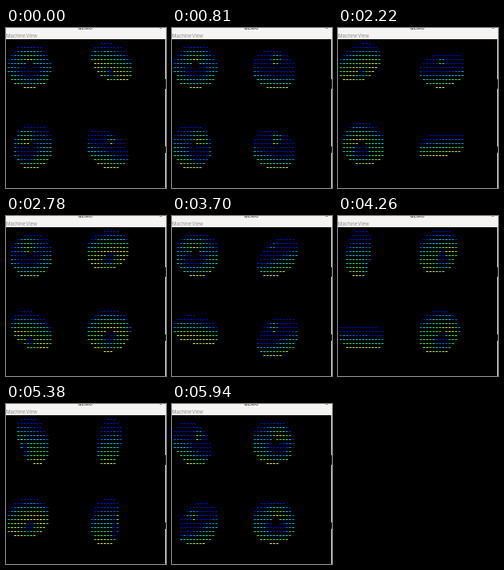
An HTML page with a canvas for the animation above (6.01 s loop, 200 by 200 pixels).

```html
<!DOCTYPE html>
<html lang="en">
<head>
<meta charset="utf-8">
<title>Four spinning donuts</title>
<style>
  html, body { margin: 0; width: 100%; height: 100%; overflow: hidden; background: #000; }
  #stage { position: relative; width: 200px; height: 200px; overflow: hidden; background: #000; }
  canvas { position: absolute; left: 0; top: 0; }
  #bar {
    position: absolute; left: 0; top: 0; width: 200px; height: 14px;
    background: #f5f4f2; color: #8c8c8c;
    font: 6px/8px Inter, "Open Sans", sans-serif;
  }
  #bar span { position: absolute; white-space: pre; }
  #title { left: 90px; top: -4px; color: #555; font-weight: 600; }
  #machine { left: 0; top: 6px; }
  #view { left: 25px; top: 6px; }
  #close { position: absolute; left: 192px; top: 0; width: 3px; height: 1px; background: #999; }
  #edge {
    position: absolute; left: 199px; top: 14px; width: 1px; height: 186px;
    background: linear-gradient(#e4e4e4 50px, #222 50px 62px, #e4e4e4 62px 134px, #222 134px 142px, #e4e4e4 142px);
  }
</style>
</head>
<body>
<div id="stage">
  <canvas id="view3d" width="200" height="200"></canvas>
  <div id="bar">
    <span id="title">QEMU</span>
    <span id="machine">Machine</span>
    <span id="view">View</span>
    <i id="close"></i>
  </div>
  <div id="edge"></div>
</div>
<script>
const ctx = document.getElementById('view3d').getContext('2d');
const LOOP = 6010, STEP = 70, LAST = 85;
const COLS = 16, ROWS = 12, PITCH_X = 4, PITCH_Y = 5;
const PALETTE = ['#0010e0', '#0028ff', '#0068ff', '#00a0ff', '#00d4f4', '#00f0b0',
                 '#20f060', '#70f830', '#c8ff40', '#ffff70', '#ffffb8', '#ffffff'];

// Tilt and heading, in degrees, at these steps.
const KEYS = [0, 12, 24, 40, 53, 69, 85];
const DONUTS = [
  { x: 30,  y: 47,  tilt: [5, 202, 400, 560, 732, 912, 1025],  head: [105, 86, 67, 41, 20, -5, -31] },
  { x: 130, y: 47,  tilt: [-60, 50, 160, 315, 425, 565, 695],  head: [130, 109, 90, 66, 46, 20, -6] },
  { x: 30,  y: 147, tilt: [35, 155, 352, 420, 612, 678, 848],  head: [8, -12, -30, -48, -76, -90, -143] },
  { x: 130, y: 147, tilt: [60, 240, 395, 512, 595, 775, 885],  head: [130, 112, 85, 72, 48, 25, -5] }
];

const circle = n => Array.from({ length: n }, (_, i) => {
  const a = i / n * 2 * Math.PI;
  return [Math.cos(a), Math.sin(a)];
});
const TUBE = circle(48), RING = circle(120);

function between(values, step) {
  let k = 0;
  while (k < KEYS.length - 2 && step >= KEYS[k + 1]) k++;
  const p = (step - KEYS[k]) / (KEYS[k + 1] - KEYS[k]);
  return (values[k] + (values[k + 1] - values[k]) * p) * Math.PI / 180;
}

function drawDonut(d, step) {
  const tilt = between(d.tilt, step), head = between(d.head, step);
  const st = Math.sin(tilt), ct = Math.cos(tilt);
  const sh = Math.sin(head), ch = Math.cos(head);
  const left = d.x - 28, top = d.y - 28;
  const depth = new Float32Array(COLS * ROWS);
  const shade = new Uint8Array(COLS * ROWS);

  for (const [cr, sr] of RING) {
    // outward direction in the plane of the ring
    const ox = -sh * cr + ch * ct * sr;
    const oy = ch * cr + sh * ct * sr;
    const oz = -st * sr;
    for (const [c, s] of TUBE) {
      const nx = c * ox + s * ch * st;
      const ny = c * oy + s * sh * st;
      const nz = c * oz + s * ct;
      const near = 1 / (6 + 2 * oz + nz);
      const col = Math.floor((d.x + 48 * near * (2 * ox + nx) - left) / PITCH_X);
      const row = Math.round((d.y + 48 * near * (2 * oy + ny) - top) / PITCH_Y);
      if (col < 0 || col >= COLS || row < 0 || row >= ROWS) continue;
      const cell = row * COLS + col;
      if (near > depth[cell]) {
        depth[cell] = near;
        shade[cell] = Math.min(11, Math.max(0, Math.floor(10.5 * (0.85 * ny - 0.42 * nz))));
      }
    }
  }

  depth.forEach((near, cell) => {
    if (!near) return;
    ctx.fillStyle = PALETTE[shade[cell]];
    ctx.fillRect(left + cell % COLS * PITCH_X + 0.25, top + Math.floor(cell / COLS) * PITCH_Y, 2.6, 1);
  });
}

// The steps are even but for a short one early on and a long one midway.
function stepAt(t) {
  const shift = t < 600 ? 0 : t < 3200 ? 20 : 10;
  return Math.min(LAST, Math.floor((t + shift) / STEP));
}

const start = performance.now();
let shown = -1;
function tick() {
  const step = stepAt((performance.now() - start) % LOOP);
  if (step !== shown) {
    shown = step;
    ctx.clearRect(0, 0, 200, 200);
    DONUTS.forEach(d => drawDonut(d, step));
  }
  requestAnimationFrame(tick);
}
tick();
</script>
</body>
</html>
```
